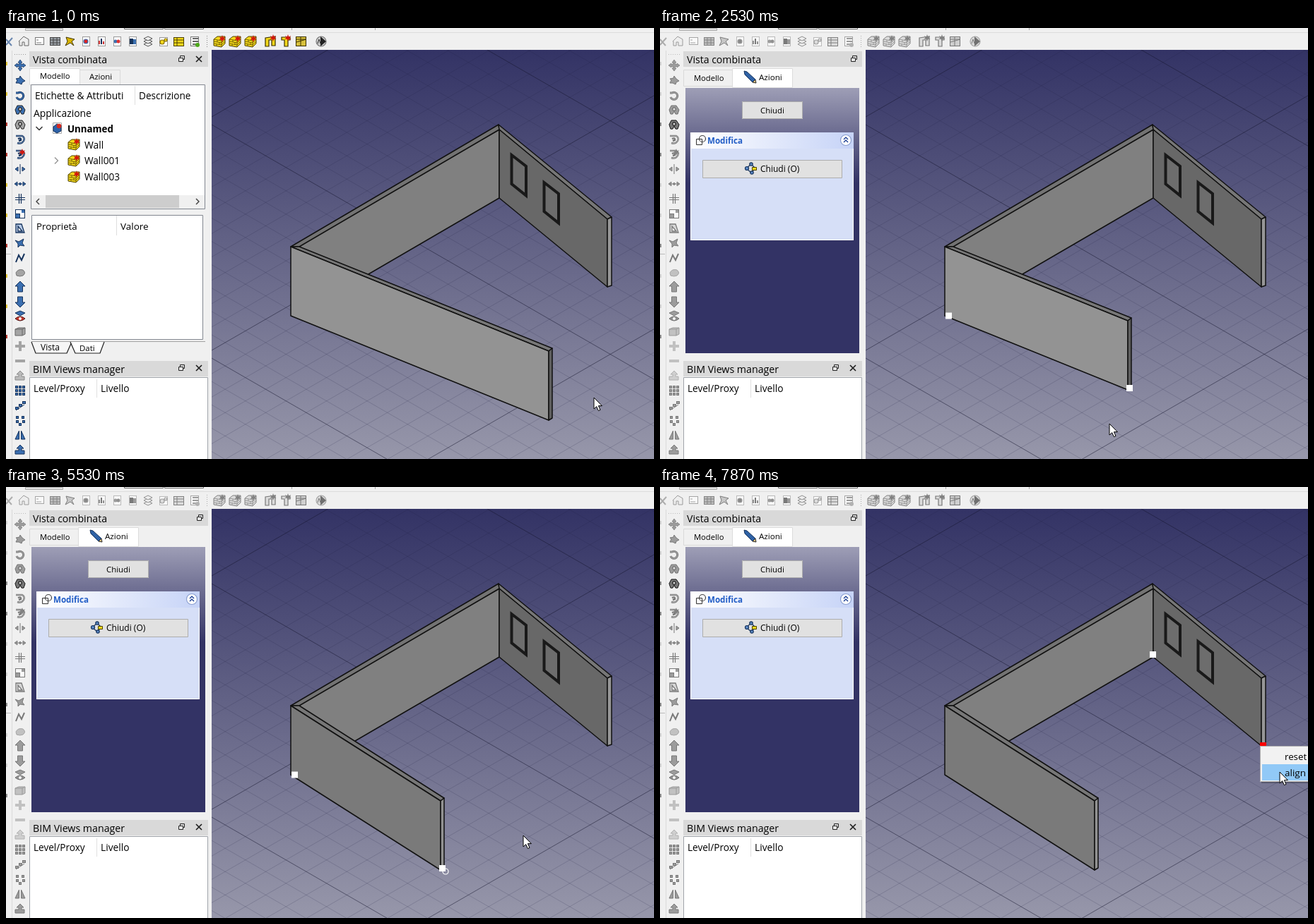
Recreate the animation shown at these times as an HTML page with a canvas. Size 917x611 px, loop 8000 ms.

```html
<!DOCTYPE html>
<html lang="it">
<head>
<meta charset="utf-8">
<title>Wall alignment</title>
<style>
html, body { margin: 0; width: 100%; height: 100%; overflow: hidden; background: #f0f0f0; }
canvas { display: block; }
</style>
</head>
<body>
<canvas id="stage" width="917" height="611"></canvas>
<script>
const W = 917, H = 611, LOOP = 8000, TICK = 1000 / 15;
const BLUE = '#3b6fb0', NAVY = '#16335c', GREY = '#a4a4a4', YELLOW = '#f3d81c';
const GREEN = '#84ff84';
const screen = document.getElementById('stage').getContext('2d');
let c = screen;

// ---- drawing helpers
function rect(x, y, w, h, fill, line) {
  if (fill) { c.fillStyle = fill; c.fillRect(x, y, w, h); }
  if (line) { c.strokeStyle = line; c.lineWidth = 1; c.strokeRect(x + .5, y + .5, w - 1, h - 1); }
}
function text(s, x, mid, size, color = '#000', weight = 400) {
  c.font = `${weight} ${size}px "Open Sans", "Noto Sans", sans-serif`;
  c.fillStyle = color;
  c.fillText(s, x, Math.round(mid + size * .36));
}
function shape(x, y, d, fill, line, width = 1) {
  const p = new Path2D(d);
  c.save();
  c.translate(x, y);
  if (fill) { c.fillStyle = fill; c.fill(p); }
  if (line) { c.strokeStyle = line; c.lineWidth = width; c.stroke(p); }
  c.restore();
}
function poly(points, fill, line = '#111', width = 1.5, join = 'round') {
  c.beginPath();
  points.forEach(([x, y]) => c.lineTo(x, y));
  c.closePath();
  c.fillStyle = fill;
  c.fill();
  c.strokeStyle = line;
  c.lineWidth = width;
  c.lineJoin = join;
  c.stroke();
}
function dot(x, y, r, fill, line) {
  c.beginPath();
  c.arc(x, y, r, 0, 7);
  if (fill) { c.fillStyle = fill; c.fill(); }
  if (line) { c.strokeStyle = line; c.lineWidth = 1.2; c.stroke(); }
}
function ramp(x0, y0, x1, y1, from, to) {
  const g = c.createLinearGradient(x0, y0, x1, y1);
  g.addColorStop(0, from);
  g.addColorStop(1, to);
  return g;
}
function layer(w, h, paint) {
  const cv = document.createElement('canvas');
  cv.width = w;
  cv.height = h;
  c = cv.getContext('2d');
  paint();
  c = screen;
  return cv;
}

// ---- icons
const STAR = 'M0-5L1.2-1.5 4-3 2.5 0 4.5 2 1.2 1.8 0 5-1.2 1.8-4.5 2-2.5 0-4-3-1.2-1.5Z';
const ARROW = 'M0-8L7-1H3.5V7H-3.5V-1H-7Z';
const HEX = 'M-7 0L-4-6H3L7 0 5 6H2L0 2-2 6H-5Z';

function brick(x, y, mark) {
  shape(x, y, 'M-8-3L-3-7H8V3L3 8-8 6Z', YELLOW, '#4d4000');
  shape(x, y, 'M-8-3L3-1 8-6M-8 0L3 2 8-3M-8 3L3 5 8 0M3-1V8M-3-2V1M0 1.5V4.5M-4 3.5V6.5', null, '#6b5a00', .9);
  if (mark === 'star') shape(x + 4, y - 4, STAR, '#d3160c');
  if (mark === 'check') {
    rect(x, y - 9, 9, 8, '#fff');
    shape(x + 4, y - 5, 'M-3.5 0L-1 3 4-4', null, '#1230ff', 2.4);
  }
}
function hexTool(x, y, color) {
  shape(x, y, HEX, color, '#222');
  dot(x, y - 1, 2.2, '#ddd', '#222');
}
function topBar() {
  shape(4, 19, 'M-4 5L5-5M-4-3L4 6', null, '#6a87b0', 2);
  shape(25, 19, 'M-7 0L0-7 7-3V6H1V1H-2V6H-6V0Z', '#eee', '#666');
  rect(41, 13, 13, 11, '#fff', '#777');
  shape(47, 19, 'M-4-2H-1M-4 2H3', null, '#777');
  rect(62, 13, 15, 12, '#9aa0a6', '#444');
  shape(69, 19, 'M-7-2H8M-7 2H8M-2-6V6M3-6V6', null, '#444');
  shape(91, 19, 'M-6-6L6-3 2 0 5 6 0 2-7 6-4 0Z', '#d9b400', '#423600');
  for (const x of [113, 135, 157, 179]) rect(x - 5, 12, 11, 14, '#fff', '#9a9a9a');
  dot(113, 19, 3, '#d22', BLUE);
  rect(131, 18, 2, 5, '#c33'); rect(134, 15, 2, 8, NAVY); rect(137, 19, 2, 4, '#c33');
  dot(155, 19, 2.5, BLUE); dot(159, 19, 2.5, '#d33');
  rect(175, 15, 5, 8, NAVY); rect(180, 16, 4, 7, BLUE);
  for (const k of [4, 0, -4]) shape(201, 19 + k, 'M-6 0L0-3 6 0 0 3Z', '#eee', '#555');
  rect(217, 13, 12, 13, '#fff', '#999');
  dot(221, 20, 3, YELLOW, '#8a7000'); dot(226, 17, 2, YELLOW, '#8a7000');
  rect(237, 13, 15, 13, YELLOW, '#4d4000');
  shape(244, 19, 'M-7-2H8M-7 2H8M-2-6V6', null, '#4d4000');
  rect(261, 12, 12, 14, '#fff', '#777');
  shape(267, 19, 'M-3-4H5M-3 0H5M-3 4H2', null, '#333', 1.6);
  dot(271, 24, 3, '#4ca81a');
  for (let y = 11; y < 28; y += 3) rect(284, y, 1, 1, '#888');
  brick(302, 19, 'star'); brick(324, 19, 'star'); brick(346, 19, 'star');
  shape(374, 19, 'M-7-5L7-7V6H2V-2H-2V7H-7Z', YELLOW, '#3a3000', 1.2);
  shape(396, 19, 'M-6-6H6V-2H3V7H-2V-2H-6Z', YELLOW, '#3a3000', 1.2);
  rect(410, 12, 15, 14, '#d8c13c', '#3a3000');
  shape(418, 19, 'M-7 1L7-3M-1-6V6M-7-3H7', null, '#3a3000');
  shape(378, 14, STAR, '#d3160c'); shape(399, 14, STAR, '#d3160c');
  dot(446, 19, 7, '#c9c9c9', '#777');
  shape(446, 19, 'M-1-7L7 0-1 7Z', '#222');
  shape(443, 19, 'M-2 3L0-3 2 3', null, '#333');
}
function leftBar() {
  const x = 20;
  for (let i = 12; i < 29; i += 3) rect(i, 37, 1, 1, '#999');
  for (let i = 0; i < 13; i++) {
    rect(0, 48 + i * 43 % 430, 2, 5, i % 3 ? '#e4c832' : '#b8372d');
  }
  shape(x, 53, 'M0-8L3-4H1.5V-1.5H4V-3L8 0 4 3V1.5H1.5V4H3L0 8-3 4H-1.5V1.5H-4V3L-8 0-4-3V-1.5H-1.5V-4H-3Z', BLUE, NAVY, .7);
  shape(x, 74, 'M-6-2L-1-3 0-6 3-2 7 1 3 3 2 6-2 4-6 4-4 0Z', BLUE, NAVY);
  shape(x, 95, 'M-6-3L-3-3A5 5 0 1 1-5 3', null, NAVY, 3);
  shape(x, 95, 'M-6-3L-3-3A5 5 0 1 1-5 3', null, BLUE, 1.5);
  hexTool(x, 116, BLUE);
  hexTool(x, 137, GREY);
  for (const y of [158, 179]) {
    shape(x, y, 'M-6-5H3Q7-3 5 2Q2 7-4 5M-3-1Q2-3 1 1L-2 2', null, NAVY, 2.4);
    shape(x, y, 'M-6-5H3Q7-3 5 2Q2 7-4 5', null, '#7d9dca', .8);
  }
  shape(23, 176, STAR, '#d3160c');
  shape(x, 200, 'M0-7V7M-7 0L-3-3V3ZM7 0L3-3V3Z', BLUE, NAVY);
  shape(x, 221, 'M-7 0H7M-8 0L-4-3V3ZM8 0L4-3V3ZM-2 0L0-2 2 0 0 2Z', BLUE, NAVY, .8);
  shape(x, 242, 'M-7-1.5H7M-7 1.5H7M-1.5-7V7M1.5-7V7', null, NAVY, 1.2);
  rect(13, 257, 14, 13, '#fff', NAVY); rect(13, 263, 7, 7, BLUE, NAVY); rect(22, 258, 4, 4, BLUE);
  shape(x, 284, 'M-6-6H2L6 6H-6ZM-3-3V4H3Z', '#b7cae6', NAVY, 1.3);
  shape(x, 305, 'M-7-4L-2-2 5-6 3 0 6 4 0 3-3 6-3 1Z', BLUE, NAVY);
  shape(x, 326, 'M-6 6L-2-4 2 3 6-6', null, NAVY, 2);
  shape(x, 347, 'M-6 0Q-3-6 4-4 9 0 4 4 0 6-5 4Z', GREY, '#777');
  shape(x, 367, ARROW, BLUE, NAVY);
  shape(x, 388, 'M0 8L7 1H3.5V-7H-3.5V1H-7Z', BLUE, NAVY);
  shape(x, 406, 'M-7-2L0-5 7-2 0 2Z', BLUE, NAVY);
  shape(x, 412, 'M-7 0Q0-6 7 0 0 6-7 0Z', '#c8382c', '#4b1010');
  dot(x, 412, 2, '#fff');
  shape(x, 430, 'M-7-3L-2-5H7V4L3 6H-7ZM-7-3H3V6M3-3L7-5', GREY, '#666');
  shape(x, 451, 'M-2-7H2V-2H7V2H2V7H-2V2H-7V-2H-2Z', GREY);
  rect(13, 470, 14, 4, GREY);
  shape(x, 493, 'M0-7L5-2H2V1H6V6H-7V1H-2V-2H-5Z', '#bbb', '#8a8a8a');
  for (let i = 0; i < 9; i++) rect(13 + i % 3 * 5, 507 + (i / 3 | 0) * 5, 4, 4, BLUE, NAVY);
  for (let i = 0; i < 3; i++) rect(13 + i * 5, 537 - i * 4, 5, 4, BLUE, NAVY);
  shape(x, 535, 'M-6 7L6-1', null, NAVY);
  for (const [i, j] of [[-6, -6], [2, -6], [-6, 0], [3, 0], [-2, 4]]) rect(x + i, 556 + j, 4, 4, BLUE, NAVY);
  shape(x, 577, 'M-1.5-6V6H-7ZM1.5-6V6H7Z', BLUE, NAVY);
  shape(x, 598, 'M0-7L5-2H2V1H6V6H-7V1H-2V-2H-5Z', BLUE, NAVY);
}

const bars = layer(W, H, () => { topBar(); leftBar(); });
const dimBars = layer(W, H, () => {
  c.filter = 'grayscale(1) opacity(.62)';
  c.drawImage(bars, 0, 0);
});

// ---- empty 3D view: gradient and isometric grid
const view = layer(W, H, () => {
  rect(291, 31, 626, 580, ramp(0, 31, 0, H, '#333365', '#9797aa'));
  c.beginPath();
  c.rect(291, 31, 626, 580);
  c.clip();
  const slope = .577, step = 33.1;
  for (const [dir, base] of [[-1, 457], [1, 137]]) {
    for (let k = -20; k <= 20; k++) {
      const y = base + k * step, major = k % 10 === 0;
      c.beginPath();
      c.moveTo(291, y);
      c.lineTo(W, y + dir * slope * 626);
      c.strokeStyle = major ? 'rgba(20,20,45,.5)' : 'rgba(30,30,65,.18)';
      c.lineWidth = 1;
      c.stroke();
    }
  }
});

// ---- 3D walls
function frontWall([x, y], face, end, hot) {
  poly([[403, 310], [415, 310], [x + 5, y - 4], [x, y]], '#777');
  poly([[403, 310], [x, y], [x, y + 98], [403, 408]], hot ? GREEN : face);
  poly([[x, y], [x + 5, y - 4], [x + 5, y + 95], [x, y + 98]], end);
}
function walls(s) {
  poly([[410, 310], [698, 144], [698, 241], [410, 409]], '#808080');
  poly([[403, 310], [697, 137], [698, 144], [415, 310]], '#737373');
  poly([[697, 137], [857, 268], [851, 271], [698, 144]], '#777');
  poly([[698, 144], [851, 271], [851, 367], [698, 241]], s.hotRight ? GREEN : '#686868');
  poly([[851, 271], [857, 268], [857, 365], [851, 367]], '#969696');
  for (const [x, y] of [[715.5, 180], [761.5, 219]]) {
    poly([[x, y], [x + 20.5, y + 16], [x + 20.5, y + 57.5], [x, y + 41]], '#6d6d6d', '#191919', 4, 'miter');
  }
  frontWall(s.end, s.aligned ? '#7a7a7a' : '#939393', s.aligned ? '#929292' : '#5f5f5f', s.hotFront);
}
const node = (x, y, color = '#fff') => rect(x - 4.5, y - 4.5, 9, 9, color);

// ---- left dock
function floatIcon(x, y) {
  rect(x - 2, y - 5, 7, 6, null, '#222');
  rect(x - 4, y - 2, 7, 6, '#e6e6e6', '#222');
}
const cross = (x, y) => shape(x, y, 'M-4-4L4 4M4-4L-4 4', null, '#222', 1.7);

function frame() {
  rect(0, 0, W, H, '#f0f0f0');
  rect(0, 6, W, 1, '#dcdcdc');
  rect(27, 0, 54, 4, '#e4e4e4', '#aaa');
  rect(167, -4, 56, 6, '#fff', '#666');
  rect(224, -4, 56, 6, '#fff', '#666');
  rect(404, 0, 1, 3, '#aaa'); rect(522, 0, 1, 3, '#aaa');
  rect(8, 32, 1, H, '#dadada');
  rect(0, 320, 7, 1, '#bbb');
  rect(33, 33, 253, 22, '#d9d9d9');
  text('Vista combinata', 38, 45, 14.1);
  rect(33, 472, 253, 22, '#d9d9d9');
  text('BIM Views manager', 38, 484, 14.2);
  floatIcon(248, 482); cross(273, 482);
  rect(33, 495, 253, 120, '#fff', '#a0a4aa');
  text('Level/Proxy', 39, 511, 13.6);
  text('Livello', 134, 511, 13.8);
  rect(128, 498, 1, 26, '#e0e0e0');
}
function modelPanel(s) {
  floatIcon(248, 44); cross(273, 44);
  rect(104, 59, 58, 22, '#f0f0f0', '#d9d9d9');
  rect(33, 57, 72, 24, '#fff', '#dcdcdc');
  text('Modello', 48, 68, 11.2);
  text('Azioni', 118, 69, 11.4);
  rect(35, 80, 247, 177, '#fff', '#828790');
  text('Etichette & Attributi', 41, 96, 13.7);
  text('Descrizione', 188, 96, 13.6);
  rect(182, 82, 1, 27, '#dedede');
  text('Applicazione', 39, 121, 13.9);
  shape(47, 142, 'M-4.5-2L0 2.5 4.5-2', null, '#333', 1.5);
  rect(66, 134, 13, 16, '#fff', '#aaa');
  shape(72, 142, 'M-5-2L0-6 6-4V4L0 7-5 4Z', '#2d62a8', NAVY);
  dot(75, 139, 3.3, '#d52a20');
  text('Unnamed', 87, 143, 13.3, '#000', 700);
  if (s.row) rect(108, s.row - 11, 58, 22, '#cde8ff');
  shape(71, 188, 'M-2-4.5L2.5 0-2 4.5', null, '#999', 1.5);
  const mark = s.touched ? 'check' : 'star';
  brick(96, 165, mark); brick(96, 188, 'star'); brick(96, 211, mark);
  text('Wall', 111, 166, 13.8);
  text('Wall001', 111, 188, 13.6);
  text('Wall003', 111, 211, 13.6);
  rect(36, 237, 245, 19, '#f0f0f0');
  rect(56, 237, 189, 18, '#cdcdcd');
  shape(45, 246, 'M2-4L-2 0 2 4', null, '#444', 1.5);
  shape(271, 246, 'M-2-4L2 0-2 4', null, '#444', 1.5);
  rect(36, 265, 243, 177, '#fff', '#828790');
  text('Proprietà', 43, 281, 13.3);
  text('Valore', 162, 281, 13.5);
  rect(156, 266, 1, 28, '#dedede');
  rect(36, 444, 246, 1, '#a0a0a0');
  shape(36, 445, 'M0 0L6 16H50L57 0', '#f6f6f6', '#222', 1.2);
  shape(91, 445, 'M0 0L7 16H42L48 0', '#fff', '#222', 1.2);
  text('Vista', 49, 453, 12);
  text('Dati', 104, 454, 11.4);
}
function editPanel() {
  floatIcon(274, 44);
  rect(33, 59, 71, 24, '#f0f0f0', '#d9d9d9');
  rect(102, 57, 86, 28, '#fff', '#dcdcdc');
  text('Modello', 48, 71, 11.2);
  text('Azioni', 140, 70, 11.6);
  shape(127, 69, 'M-8-8L-4-7 8 4 4 8-7-3Z', '#2f62a6', NAVY);
  shape(127, 69, 'M8 4L9 9 4 8Z', '#e9c98a', '#222');
  rect(36, 85, 246, 376, ramp(0, 85, 0, 220, '#9e9eb6', '#333365'));
  rect(116, 104, 86, 25, '#e1e1e1', '#adadad');
  text('Chiudi', 142, 117, 11.4);
  rect(43, 148, 231, 153, '#d6dff7', '#fff');
  rect(43, 148, 231, 23, ramp(44, 0, 274, 0, '#fff', '#c6d3f7'));
  rect(51, 157, 9, 9, '#fff', '#333');
  dot(60, 157, 4.5, null, '#444');
  text('Modifica', 67, 160, 11.6, '#215dc6', 700);
  dot(263, 159, 7.5, '#fff', '#8b9fd0');
  shape(263, 159, 'M-3-1L0-4 3-1M-3 3L0 0 3 3', null, '#1c3f94', 1.4);
  rect(60, 187, 198, 26, '#e1e1e1', '#adadad');
  shape(129, 199, 'M-7 0L0-6 6 0 0 6Z', null, NAVY, 1.2);
  dot(123, 199, 2.5, '#5f8cc9', NAVY); dot(129, 193, 2.2, '#5f8cc9', NAVY); dot(130, 205, 2.2, '#5f8cc9', NAVY);
  rect(130, 197, 7, 5, YELLOW, '#4b4000');
  text('Chiudi (O)', 142, 200, 12);
}
function menu(x, y, active) {
  rect(x + 2, y + 2, 117, 51, 'rgba(0,0,0,.25)');
  rect(x, y, 117, 51, '#f2f2f2', '#b0b0b0');
  if (active >= 0) rect(x + 3, y + 3 + active * 23, 111, 23, '#91c9f7');
  text('reset end', x + 35, y + 15, 13.3);
  text('align', x + 35, y + 38, 13.5);
}
function pointer([x, y]) {
  shape(x, y, 'M0 0V16L3.7 12.6 6.4 18.6 9 17.4 6.4 11.6H11.4Z', '#fff', '#000', 1);
}

// ---- timeline
const PATH = [
  [0, 832, 524], [400, 736, 492], [730, 736, 492], [930, 740, 498], [1400, 779, 560], [1600, 779, 560],
  [1800, 774, 556], [1930, 774, 556], [2270, 664, 511], [2530, 636, 561], [2670, 634, 569],
  [3070, 663, 519], [3333, 663, 519], [3667, 694, 555], [3800, 694, 555], [4000, 695, 538],
  [4130, 697, 550], [4267, 697, 550], [4930, 626, 545], [5200, 626, 545], [5530, 732, 495],
  [5800, 752, 454], [5933, 752, 454], [6400, 833, 309], [6800, 833, 309], [7067, 849, 366],
  [7467, 849, 366], [7867, 877, 404]
];
function pointerAt(t) {
  const i = PATH.findIndex(k => k[0] > t);
  if (i < 0) return PATH[PATH.length - 1].slice(1);
  const [t0, x0, y0] = PATH[i - 1], [t1, x1, y1] = PATH[i], u = (t - t0) / (t1 - t0);
  return [Math.round(x0 + (x1 - x0) * u), Math.round(y0 + (y1 - y0) * u)];
}
const inside = (t, a, b) => t >= a && t < b;

function draw(now) {
  const t = Math.floor(now % LOOP / TICK + .1) * TICK + 1;
  const cur = pointerAt(t);
  const edit = inside(t, 930, 6000) || t >= 6866;
  const first = t < 6000;
  const picked = inside(t, 333, 930) || inside(t, 6600, 6866);
  const s = {
    end: t < 2270 ? [768, 458] : t < 5066 ? [662, 415] : [615, 445],
    aligned: t >= 5066,
    touched: t >= 6000,
    hotFront: inside(t, 133, 930),
    hotRight: inside(t, 6333, 6866),
    row: picked ? (first ? 211 : 188) : 0
  };
  frame();
  c.drawImage(edit ? dimBars : bars, 0, 0);
  if (picked) hexTool(20, 137, BLUE);
  if (edit) {
    hexTool(20, 137, '#777');
    editPanel();
  } else modelPanel(s);

  c.drawImage(view, 0, 0);
  walls(s);
  if (edit && first) {
    const hot = inside(t, 1666, 2270) || inside(t, 2930, 4400);
    node(408.5, 408);
    node(s.end[0] + 2.5, s.end[1] + 95.5, hot ? '#f00' : '#fff');
    if (t >= 4930) dot(622, 545, 4, null, '#fff');
  } else if (edit) {
    node(697.5, 237.5);
    node(853.5, 366.5, t >= 7000 ? '#f00' : '#fff');
  }
  const over = y => cur[1] < y + 3 ? -1 : cur[1] < y + 26 ? 0 : 1;
  if (inside(t, 3133, 4333)) menu(663, 520, over(520));
  if (t >= 7466) menu(849, 367, over(367));
  pointer(cur);
}

function loop() {
  draw(performance.now());
  requestAnimationFrame(loop);
}
loop();
</script>
</body>
</html>
```
